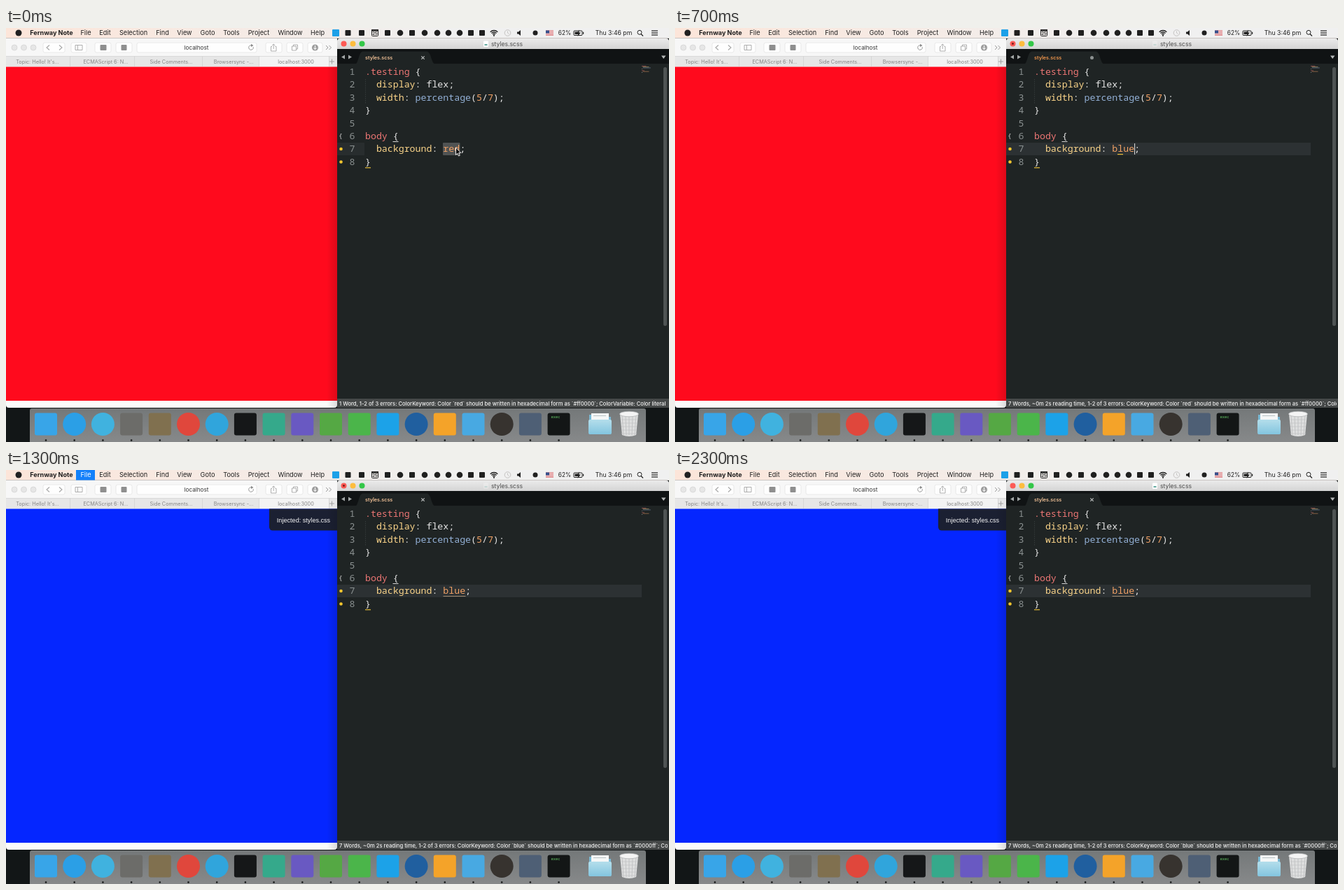
An HTML page with a canvas for the animation above (2400 ms loop, 947 px wide and 592 px high).

```html
<!DOCTYPE html>
<html lang="en">
<head>
<meta charset="utf-8">
<title>Live style reload</title>
<style>
html, body { margin: 0; width: 100%; height: 100%; overflow: hidden; background: #090d0e; }
canvas { display: block; }
</style>
</head>
<body>
<canvas id="stage" width="947" height="592"></canvas>
<script>
const c = document.getElementById('stage').getContext('2d');
const LOOP = 2400;
const SANS = 'Inter, "Liberation Sans", sans-serif';
const MONO = '"Noto Sans Mono", "DejaVu Sans Mono", monospace';
const CHAR = 7.95, ROW = 18.43, CODE_X = 513;
const PINK = '#ec7674', YELLOW = '#fbd58a', WHITE = '#e6e6e6', BLUE = '#93b0d6', ORANGE = '#f2a266';

function rect(x, y, w, h, fill, r = 0) {
  c.fillStyle = fill;
  c.beginPath();
  c.roundRect(x, y, w, h, r);
  c.fill();
}
function box(x, y, w, h, stroke, r = 0, width = 1) {
  c.strokeStyle = stroke;
  c.lineWidth = width;
  c.beginPath();
  c.roundRect(x, y, w, h, r);
  c.stroke();
}
function disc(x, y, r, fill) {
  c.fillStyle = fill;
  c.beginPath();
  c.arc(x, y, r, 0, 7);
  c.fill();
}
function arc(x, y, r, color, from = 0, to = 7, width = 1) {
  c.strokeStyle = color;
  c.lineWidth = width;
  c.beginPath();
  c.arc(x, y, r, from, to);
  c.stroke();
}
function path(d, color, width = 1) {
  c.strokeStyle = color;
  c.lineWidth = width;
  c.stroke(new Path2D(d));
}
function shape(d, fill) {
  c.fillStyle = fill;
  c.fill(new Path2D(d));
}
function text(s, x, y, size, fill, align = 'center', weight = 400, font = SANS) {
  c.font = `${weight} ${size}px ${font}`;
  c.textAlign = align;
  c.fillStyle = fill;
  c.fillText(s, x, y);
}
function fade(x0, y0, x1, y1, from, to) {
  const g = c.createLinearGradient(x0, y0, x1, y1);
  g.addColorStop(0, from);
  g.addColorStop(1, to);
  return g;
}

function menuBar(fileActive) {
  const ink = '#202020';
  rect(0, 0, 947, 15, fade(0, 0, 640, 0, '#fce5d9', '#f0f0f0'));
  rect(0, 14, 947, 1, '#c9c5c3');
  disc(18, 7, 4.5, ink);
  text('Fernway Note', 65, 10.4, 9.1, ink, 'center', 700);
  if (fileActive) rect(100, 0, 27, 14.5, '#1480fa');
  const items = [['File', 114], ['Edit', 141.5], ['Selection', 182], ['Find', 223.5], ['View', 255],
    ['Goto', 288], ['Tools', 322], ['Project', 361], ['Window', 406], ['Help', 445]];
  for (const [name, x] of items) text(name, x, 10.4, 9.2, fileActive && name === 'File' ? '#fff' : ink);

  rect(466, 2, 10, 10, '#1ca0e8', 1);
  for (const x of [488.5, 508, 545, 580, 664, 680]) rect(x - 4, 3, 8, 8, ink, 1);
  for (const x of [563, 598, 616, 632, 648]) disc(x, 7, 4.3, ink);
  box(522.5, 2.5, 9, 9, ink, 1);
  rect(522, 2, 10, 2.5, ink);
  text('25', 527, 10.4, 6, ink, 'center', 600);

  for (const r of [2.5, 5, 7.5]) arc(697, 11, r, ink, -2.35, -.79, 1.4);
  disc(697, 10.8, 1.1, ink);
  arc(716.5, 7, 4.3, '#c5c3c2');
  path('M716.5 4.5V7L718.5 8.5', '#c5c3c2');
  shape('M730 5.5H732L735 3V11L732 8.5H730Z', ink);
  disc(756, 7, 3.5, ink);
  for (let i = 0; i < 7; i++) rect(771, 3.5 + i, 11, 1, i % 2 ? '#f5f0f0' : '#d23c42');
  rect(771, 3.5, 5, 4, '#34518e');
  text('62%', 798, 10.4, 8.4, ink);
  box(811, 4, 12, 6.5, ink, 1);
  rect(812.5, 5.5, 6, 3.5, ink);
  rect(824, 5.8, 1.2, 3, ink);
  shape('M819 2.5L815 7.7H817.5L816.5 12L821 6.5H818Z', ink);
  text('Thu 3:46 pm', 868, 10.4, 8.7, ink);
  arc(905, 6.3, 3, ink);
  path('M907 8.5L910 11.5', ink, 1.2);
  for (let i = 0; i < 3; i++) rect(922, 3.4 + 3 * i, 9, 1.2, ink);
}

function browser(injected) {
  const gray = '#a5a5a5', border = '#e4e4e4';
  rect(0, 15, 473, 528, '#fbfbfb', [0, 0, 4, 4]);
  rect(0, 15, 473, 25, '#f7f7f7');
  for (const x of [12, 25.5, 39]) {
    disc(x, 28, 4, '#e6e6e6');
    arc(x, 28, 4, '#d2d2d2', 0, 7, .7);
  }
  for (const [x, w] of [[53, 31], [93, 22], [127, 23], [157, 23], [187, 171], [371, 23], [401, 23], [431, 21]]) {
    rect(x, 21, w, 14, '#fefefe', 2.5);
    box(x, 21, w, 14, border, 2.5, .8);
  }
  path('M62 24.5L58 28L62 31.5M76 24.5L80 28L76 31.5', gray, 1.1);
  box(99, 24.5, 10, 7, gray, 0, .9);
  path('M102.5 24.5V31.5', gray, .9);
  rect(134.5, 24, 9, 8, '#8f8f8f', 1);
  rect(164.5, 24, 8, 8, '#8f8f8f', 1);
  text('localhost', 272, 31, 8.2, '#333');
  arc(350, 28, 3.2, '#888', -.3, 4.9, .9);
  shape('M350 22.8L353.5 25L350 27Z', '#888');
  path('M380 26.5H378.5V33H386V26.5H384.5M382.2 30V23L380 25.2M382.2 23L384.5 25.2', gray, .9);
  box(408.5, 26, 6, 6, gray, 0, .9);
  path('M410.5 26V24H416.5V30H414.5', gray, .9);
  disc(441.5, 28, 4.6, '#a0a0a0');
  path('M441.5 25V30.5M439.3 28.5L441.5 30.7L443.7 28.5', '#fff', 1);
  path('M457 25L460 28L457 31M461.5 25L464.5 28L461.5 31', '#999', 1);

  rect(0, 40, 473, 15, '#e6e6e6');
  rect(361, 40, 100, 15, '#f3f3f3');
  rect(0, 40, 473, .8, '#d4d4d4');
  for (const x of [91, 183, 280, 361, 461]) rect(x, 40, .8, 15, '#d2d2d2');
  const tabs = [["Topic: Hello! It's...", 45], ['ECMAScript 6: N...', 142.5], ['Side Comments...', 236],
    ['Browsersync -...', 325], ['localhost:3000', 414]];
  for (const [name, x] of tabs) text(name, x, 50.6, 7.3, '#858585');
  path('M462 48H469M465.5 44.5V51.5', '#999', .9);

  rect(0, 55.4, 473, 477.6, injected ? '#0526ff' : '#ff0a1d');
  if (injected) {
    rect(376, 55.4, 97, 31.2, '#1b2032', [0, 0, 0, 5]);
    text('Injected: styles.css', 425, 74.5, 9.1, '#f4f4f6', 'center', 400, '"Liberation Sans", Arial, sans-serif');
  }
  rect(458, 55, 15, 488, fade(458, 0, 473, 0, 'rgba(0,0,0,0)', 'rgba(0,0,0,.13)'));
}

// Draws [string, color] parts on a numbered row, starting at a column.
function code(row, col, ...parts) {
  for (const [s, color] of parts) {
    text(s, CODE_X + col * CHAR, 66.8 + (row - 1) * ROW, 13.25, color, 'left', 500, MONO);
    col += s.length;
  }
}

function pointer(x, y) {
  const d = new Path2D('M0 0V10.5L2.4 8.3L4 12L5.8 11.2L4.2 7.6H7.4Z');
  c.save();
  c.translate(x, y);
  c.fillStyle = '#111';
  c.fill(d);
  c.strokeStyle = '#fff';
  c.lineWidth = .9;
  c.stroke(d);
  c.restore();
}

function editor(t) {
  const value = t < 300 ? 'red' : 'blue'.slice(0, Math.min(4, Math.floor(t / 100) - 2));
  const typing = t >= 300, unsaved = typing && t < 1100, linted = t >= 1100;
  const dimTitle = typing && t < 1500;
  const caret = typing && (t < 1100 || t >= 1600 && t < 2100);
  const bg = '#1f2424';

  rect(473, 15, 474, 528, bg, [4, 4, 0, 0]);
  rect(473, 15, 474, 15, fade(0, 15, 0, 30, '#ebebeb', '#d4d4d4'), [4, 4, 0, 0]);
  [[482.5, '#fc5a55'], [495.5, '#fdbd3e'], [508.5, '#33c748']].forEach(([x, color]) => disc(x, 22.5, 4, color));
  if (dimTitle) disc(482.5, 22.5, 1.4, '#721b18');
  c.globalAlpha = dimTitle ? .25 : 1;
  rect(682, 18.5, 7, 8.5, '#fff', 1);
  rect(683.5, 23, 4, 2, '#65aaa0');
  c.globalAlpha = 1;
  text('styles.scss', 715.5, 25.6, 8.6, '#4a4a4a');

  rect(473, 30, 474, 22, '#101314');
  shape('M498 52C504 52 503 34 510 33.5H601C608 34 607 52 614 52Z', bg);
  rect(473, 51, 474, 2, bg);
  shape('M484 38.5V44.5L479 41.5ZM489 38.5V44.5L494 41.5Z', '#a5a9a9');
  shape('M936 39.5H942.5L939.2 44Z', '#b5b8b8');
  text('styles.scss', 513, 45, 7.2, unsaved ? '#f0964c' : '#f0c096', 'left', 600);
  if (unsaved) disc(595.5, 42.5, 2.5, '#8d9292');
  else path('M593.3 40.3L597.7 44.7M597.7 40.3L593.3 44.7', '#c2c5c5', 1.1);

  rect(473, 164, typing ? 435 : 39, 18, typing ? '#2c3133' : '#282d2e');
  for (let n = 1; n <= 8; n++) text(n, 494.5, 66.8 + (n - 1) * ROW, 13.25, '#8b9191', 'center', 400, MONO);
  text('{', 478, 157.5, 9, '#e3e3e3', 'center', 500, MONO);
  disc(478.5, 173, 2.3, '#f3c62f');
  disc(478.5, 191.5, 2.3, '#f3c62f');
  for (let y = 73; y < 109; y += 3) rect(513, y, .8, 1.4, '#3c4242');

  if (!typing) rect(624, 164, 24.5, 18, '#505353', 1);
  code(1, 0, ['.testing', PINK], [' {', WHITE]);
  code(2, 2, ['display', YELLOW], [': flex;', WHITE]);
  code(3, 2, ['width', YELLOW], [': ', WHITE], ['percentage', BLUE], ['(', WHITE], ['5', ORANGE],
    ['/', WHITE], ['7', ORANGE], [');', WHITE]);
  code(4, 0, ['}', WHITE]);
  code(6, 0, ['body', PINK], [' {', WHITE]);
  const known = value === 'red' || value === 'blue';
  code(7, 2, ['background', YELLOW], [': ', WHITE], [value, known ? ORANGE : WHITE], [';', WHITE]);
  code(8, 0, ['}', WHITE]);
  rect(552.5, 162, 8, 1, '#d8d8d8');
  rect(513, 199.2, 8, 1.2, '#e8bd37');
  if (linted) rect(624.5, 180, 32, 1, '#a08a70');
  else if (typing) rect(632, 180, 8, 1.2, '#e8bd37');
  if (caret) rect(624.3 + value.length * CHAR, 165, 1, 16, '#e4e4e4');
  if (!typing) pointer(642.5, 171);

  const minimap = [[0, 8, PINK], [2, 11, YELLOW], [2, 14, BLUE], [0, 1, WHITE], 0, [0, 5, PINK], [2, 11, ORANGE], [0, 1, WHITE]];
  c.globalAlpha = .6;
  minimap.forEach((m, i) => m && rect(908 + m[0] * .8, 54 + i * 1.3, m[1] * .8, .8, m[2]));
  c.globalAlpha = 1;
  rect(939, 56, 5, 370, '#4f5454', 2.5);

  rect(473, 530, 474, 13, '#454848');
  const words = t < 600 ? '1 Word, ' : '7 Words, ~0m 2s reading time, ';
  const [color, hex] = linted ? ['blue', '#0000ff'] : ['red', '#ff0000'];
  c.save();
  c.beginPath();
  c.rect(473, 530, 472, 13);
  c.clip();
  text(`${words}1-2 of 3 errors: ColorKeyword: Color \`${color}\` should be written in hexadecimal form as \`${hex}\`; ColorVariable: Color literal`,
    476, 539.6, 7.6, '#f4f4f4', 'left', 500);
  c.restore();
}

function dock() {
  rect(0, 543, 947, 49, '#121617');
  rect(34, 544, 880, 48, fade(0, 544, 0, 592, '#747879', '#87898a'), [3, 3, 0, 0]);
  // Round icons are marked with 1.
  const icons = [['#38a5e8'], ['#2b9fe6', 1], ['#40b2df', 1], ['#6c6c69'], ['#80704f'], ['#e0473c', 1], ['#30a5dc', 1],
    ['#151718'], ['#35a98b'], ['#6959c2'], ['#55a844'], ['#4bb54a'], ['#1ca2e8'], ['#205f9f', 1],
    ['#f4a329'], ['#48a9e2'], ['#37332f', 1], ['#4e5f75'], ['#131616']];
  icons.forEach(([color, round], i) => {
    const x = 57 + i * 40.7;
    if (round) disc(x, 566.5, 16.5, color);
    else rect(x - 16, 550.5, 32, 32, color, 3);
    disc(x, 589.5, 1.3, '#101313');
  });
  text('exec', 785, 558, 5.5, '#65c867', 'center', 400, MONO);

  shape('M833 553H843L846 556H864V581H833Z', '#79b9d5');
  rect(836, 551, 25, 12, '#f5f7f7');
  rect(839, 554, 18, 1, '#b9c2c5');
  rect(832, 560, 33, 21, fade(0, 560, 0, 581, '#b4deeb', '#83c5df'), 2);
  shape('M877 552H903L900 582Q890 586 880 582Z', '#dedfdf');
  for (let i = -2; i <= 2; i++) path(`M${890 + i * 5} 554L${890 + i * 4} 582`, '#b6b8b9', .7);
  for (let y = 560; y < 582; y += 5) path(`M879 ${y}H901`, '#c0c2c3', .7);
  c.fillStyle = '#f4f4f4';
  c.beginPath();
  c.ellipse(890, 552, 13.5, 3.8, 0, 0, 7);
  c.fill();
  c.strokeStyle = '#aaadae';
  c.stroke();
}

function frame(now) {
  const t = now % LOOP;
  c.clearRect(0, 0, 947, 592);
  dock();
  browser(t >= 1300);
  editor(t);
  menuBar(t >= 1300 && t < 1400);
  requestAnimationFrame(frame);
}
frame(0);
</script>
</body>
</html>
```
